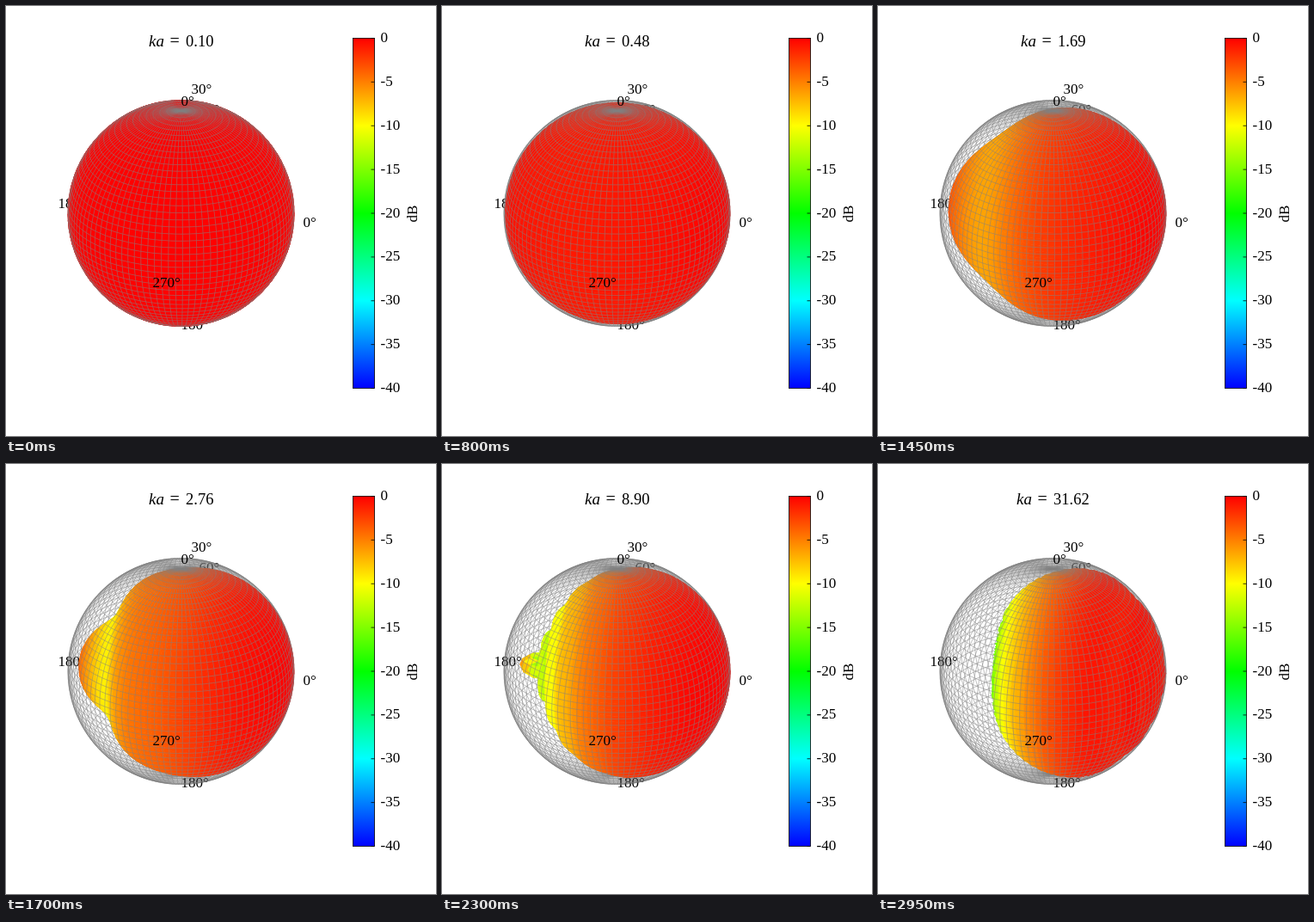
Recreate the animation shown at these times as an HTML page with a canvas. Size 500x500 px, loop 3 s.

```html
<!DOCTYPE html>
<html>
<head>
<meta charset="utf-8">
<style>
html, body { margin: 0; width: 100%; height: 100%; overflow: hidden; background: #fff; }
canvas { display: block; }
</style>
</head>
<body>
<canvas id="stage" width="500" height="500"></canvas>
<script>
const ctx = document.getElementById('stage').getContext('2d');
const FRAMES = 60, STEP = 50, ORDER = 35;
const ROWS = 50, COLS = 100;
const CX = 203.5, CY = 241, R = 131.5;
const AZ = 10 * Math.PI / 180, EL = 25 * Math.PI / 180;
const cosA = Math.cos(AZ), sinA = Math.sin(AZ), cosE = Math.cos(EL), sinE = Math.sin(EL);
const FONT = '"Liberation Serif", "Times New Roman", serif';
const hue = db => `hsl(${-6 * db},100%,50%)`;

// Unit sphere grid: screen offsets, depth and cosine of the angle to the 0° axis
const grid = [];
for (let i = 0; i <= ROWS; i++) {
  for (let j = 0; j <= COLS; j++) {
    const p = Math.PI * i / ROWS, a = 2 * Math.PI * j / COLS;
    const x = Math.sin(p) * Math.cos(a), y = Math.sin(p) * Math.sin(a), z = Math.cos(p);
    grid.push({
      u: R * (x * cosA + y * sinA),
      v: -R * (z * cosE + sinE * (y * cosA - x * sinA)),
      d: cosE * (x * sinA - y * cosA) + z * sinE,
      c: x
    });
  }
}
const at = (i, j) => i * (COLS + 1) + j;

const wires = { front: new Path2D(), back: new Path2D() };
function addWire(a, b) {
  const path = a.d + b.d > 0 ? wires.front : wires.back;
  path.moveTo(CX + a.u, CY + a.v);
  path.lineTo(CX + b.u, CY + b.v);
}
for (let i = 0; i < ROWS; i++) {
  for (let j = 0; j < COLS; j++) {
    const a = grid[at(i, j)];
    addWire(a, grid[at(i + 1, j)]);
    if (i) addWire(a, grid[at(i, j + 1)]);
  }
}

// Far-field series (2n+1)(-i)^n / h_n'(ka) for a point radiator on a rigid sphere
function coefficients(ka) {
  let prev = [Math.sin(ka) / ka, -Math.cos(ka) / ka];
  let cur = [Math.sin(ka) / ka ** 2 - Math.cos(ka) / ka, -Math.cos(ka) / ka ** 2 - Math.sin(ka) / ka];
  const out = [];
  for (let n = 0; n <= ORDER; n++) {
    let slope;
    if (n === 0) {
      slope = cur.map(v => -v);
    } else {
      slope = cur.map((v, k) => prev[k] - (n + 1) / ka * v);
      const next = cur.map((v, k) => (2 * n + 1) / ka * v - prev[k]);
      prev = cur;
      cur = next;
    }
    const size = Math.hypot(...slope), w = (2 * n + 1) / size;
    const re = w * slope[0] / size, im = -w * slope[1] / size;
    out.push([[re, im], [im, -re], [-re, -im], [-im, re]][n % 4]);
    if (n === 0) {
      const next = cur.map((v, k) => 3 / ka * v - prev[k]);
      // order 1 still needs h_0 and h_1, so only check the recurrence stays finite
      if (!next.every(Number.isFinite)) break;
    }
  }
  return out;
}

function levels(ka) {
  const coef = coefficients(ka);
  const mag = grid.map(({ c }) => {
    let p0 = 1, p1 = c, re = 0, im = 0;
    coef.forEach(([a, b], n) => {
      re += a * p0;
      im += b * p0;
      const p2 = ((2 * n + 3) * c * p1 - (n + 1) * p0) / (n + 2);
      p0 = p1;
      p1 = p2;
    });
    return Math.hypot(re, im);
  });
  const top = Math.max(...mag);
  return mag.map(m => Math.max(-40, 20 * Math.log10(m / top)));
}

function drawBody(ka) {
  const db = levels(ka);
  const pts = grid.map((g, k) => {
    const r = 1 + db[k] / 40;
    return { x: CX + g.u * r, y: CY + g.v * r, d: g.d * r, db: db[k] };
  });
  const quads = [];
  for (let i = 0; i < ROWS; i++) {
    for (let j = 0; j < COLS; j++) {
      const q = [at(i, j), at(i + 1, j), at(i + 1, j + 1), at(i, j + 1)].map(k => pts[k]);
      const [a, b, c, e] = q;
      if ((c.x - a.x) * (e.y - b.y) - (c.y - a.y) * (e.x - b.x) >= 0) continue;
      quads.push({ q, d: a.d + b.d + c.d + e.d, db: (a.db + b.db + c.db + e.db) / 4 });
    }
  }
  quads.sort((a, b) => a.d - b.d);
  ctx.lineWidth = 0.7;
  for (const { q, db } of quads) {
    ctx.beginPath();
    for (const p of q) ctx.lineTo(p.x, p.y);
    ctx.closePath();
    ctx.fillStyle = ctx.strokeStyle = hue(db);
    ctx.fill();
    ctx.stroke();
  }
}

function text(s, x, y, size = 17, style = '') {
  ctx.font = `${style} ${size}px ${FONT}`;
  ctx.fillStyle = '#000';
  ctx.fillText(s, x, y);
}

function drawWire(path) {
  ctx.strokeStyle = '#808080';
  ctx.lineWidth = 0.5;
  ctx.stroke(path);
}

function drawBar() {
  const fill = ctx.createLinearGradient(0, 37.5, 0, 444.5);
  for (let k = 0; k <= 24; k++) fill.addColorStop(k / 24, hue(-40 * k / 24));
  ctx.fillStyle = fill;
  ctx.fillRect(403.5, 37.5, 25, 407);
  ctx.strokeStyle = '#000';
  ctx.lineWidth = 0.8;
  ctx.strokeRect(403.5, 37.5, 25, 407);
  for (let k = 0; k <= 8; k++) {
    const y = 37.5 + k * 407 / 8;
    ctx.beginPath();
    ctx.moveTo(424.5, y);
    ctx.lineTo(428.5, y);
    ctx.stroke();
    text(k ? `-${5 * k}` : '0', 435.5, y + 4.5);
  }
  ctx.save();
  ctx.translate(478, 251.5);
  ctx.rotate(-Math.PI / 2);
  text('dB', 0, 0);
  ctx.restore();
}

function drawTitle(ka) {
  const value = ka.toFixed(2), left = 204 - (value.length > 4 ? 43 : 38);
  text('ka', left, 46.5, 19, 'italic');
  text('=', left + 24.5, 46.5, 20);
  text(value, left + 43, 46.5, 18.5);
}

function draw(frame) {
  const ka = 10 ** (-1 + 2.5 * frame / (FRAMES - 1));
  ctx.fillStyle = '#fff';
  ctx.fillRect(0, 0, 500, 500);
  drawWire(wires.back);
  text('0°', 345.5, 256.5);
  text('180°', 60.5, 235);
  text('60°', 224.5, 126);
  text('180°', 203.5, 376);
  drawBody(ka);
  drawWire(wires.front);
  text('0°', 203.5, 116);
  text('30°', 215.5, 102);
  text('270°', 170.5, 326.5);
  drawTitle(ka);
  drawBar();
}

let shown = -1;
function tick() {
  const frame = Math.floor(performance.now() / STEP) % FRAMES;
  if (frame !== shown) draw(shown = frame);
  requestAnimationFrame(tick);
}
tick();
</script>
</body>
</html>
```
